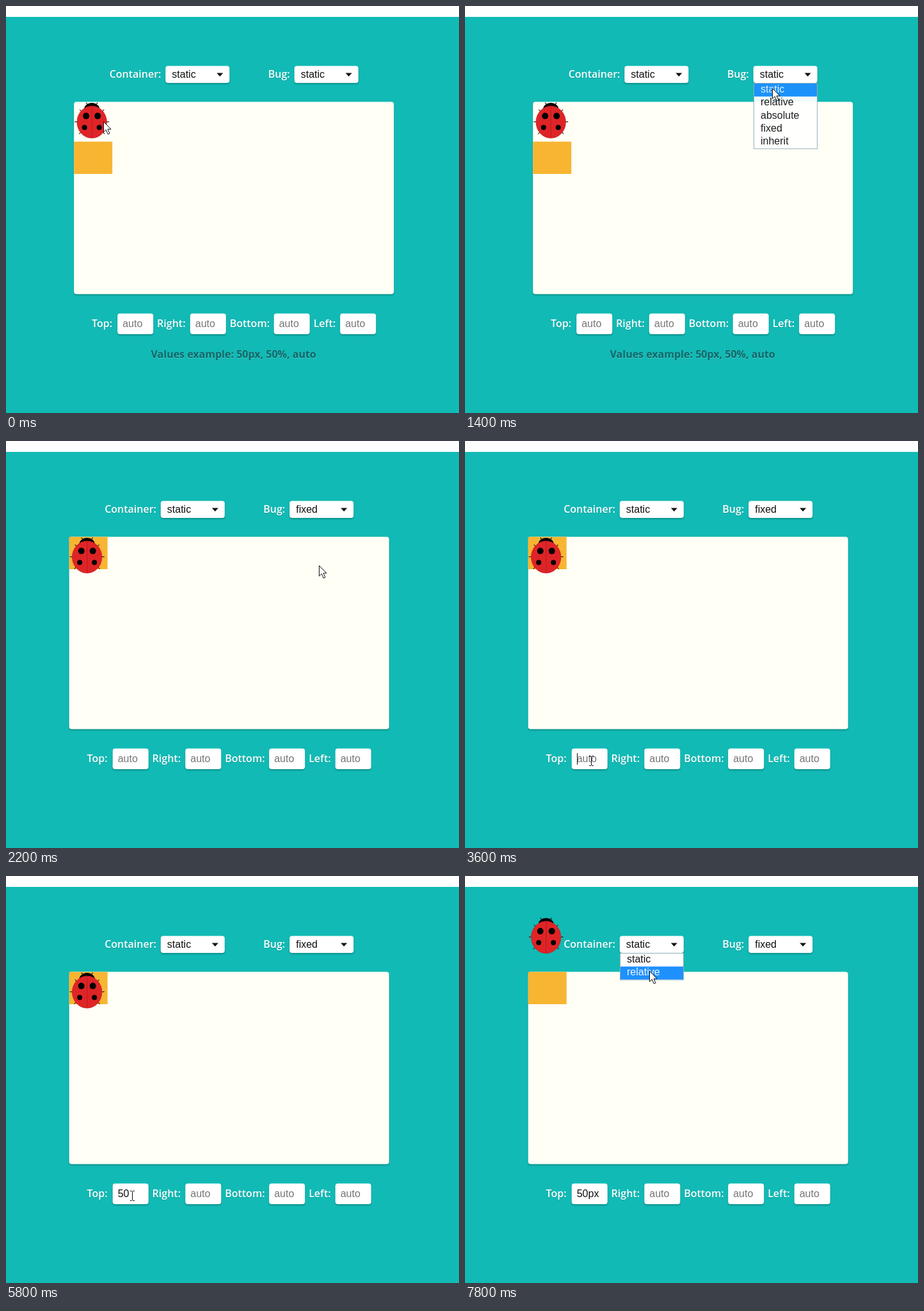
Write an HTML page that moves like this. It is 708 px wide and 635 px high and loops after 8000 ms.

```html
<!DOCTYPE html>
<html lang="en">
<head>
<meta charset="utf-8">
<title>CSS positioning demo</title>
<style>
  html, body { margin: 0; width: 100%; height: 100%; overflow: hidden; background: #fff; }
  svg { display: block; width: 708px; height: 635px; }
  .raised { filter: drop-shadow(0 2px 1px rgba(0, 0, 0, .22)); }
  .label { font: 600 16px "Open Sans", sans-serif; fill: #fff; }
  .label.shade { fill: rgba(0, 0, 0, .16); }
  .hint { font: 700 16px "Open Sans", sans-serif; fill: #126668; }
  .hint.glow { fill: rgba(255, 255, 255, .25); }
  .field { font: 16px "Liberation Sans", Arial, sans-serif; fill: #111; }
  .field.empty { fill: #757575; }
  .field.picked { fill: #f0f8ff; }
</style>
</head>
<body>
<svg id="stage" viewBox="0 0 708 635"></svg>
<script>
const stage = document.getElementById('stage');
const LOOP = 8000, STEP = 200;
const SCROLLBAR_SHIFT = 7.5;
const CONTAINER_OPTIONS = ['static', 'relative'];
const BUG_OPTIONS = ['static', 'relative', 'absolute', 'fixed', 'inherit'];
const ROW = 20.25, FADE = 160;
const SELECT_Y = 93.6, BOX_Y = 149.6, INPUT_Y = 479.7;

// Pointer waypoints: time, x, y
const POINTER = [
  [0, 152, 180], [200, 152, 180], [1000, 482, 106], [1200, 480, 108],
  [1400, 480, 128], [1800, 487, 187], [2000, 489, 194], [2200, 489, 194],
  [3200, 197, 499], [6400, 197, 499], [6800, 147, 453], [7000, 147, 453],
  [7400, 287, 108], [7600, 288, 128], [7800, 288, 148]
];

function pointerAt(t) {
  const next = POINTER.findIndex(p => p[0] > t);
  if (next < 0) return POINTER[POINTER.length - 1].slice(1);
  const [t0, x0, y0] = POINTER[next - 1], [t1, x1, y1] = POINTER[next];
  const u = (t - t0) / (t1 - t0), ease = u * u * (3 - 2 * u);
  return [Math.round(x0 + (x1 - x0) * ease), Math.round(y0 + (y1 - y0) * ease)];
}

function typedAt(t) {
  return t < 5000 ? '' : t < 5200 ? '5' : t < 6200 ? '50' : t < 6400 ? '50p' : '50px';
}

// The caret restarts its blink at focus and at every key press.
function caretOn(t) {
  if (t < 3400 || t >= 6600) return false;
  const since = [6400, 6200, 5200, 5000, 3400].find(start => t >= start);
  return (t - since) % 1000 < 500;
}

const rect = (x, y, w, h, fill, extra = '') =>
  `<rect x="${x}" y="${y}" width="${w}" height="${h}" fill="${fill}" ${extra}/>`;
const raised = (x, y, w, h, fill) => rect(x, y, w, h, fill, 'rx="4" class="raised"');
const text = (x, y, s, cls) => `<text x="${x}" y="${y}" class="${cls}">${s}</text>`;
const label = (x, y, s) => text(x, y + 1, s, 'label shade') + text(x, y, s, 'label');

function select(x, value) {
  return raised(x, SELECT_Y, 100, 26.4, '#fff') + text(x + 10, 112, value, 'field') +
    `<path d="M${x + 80} 104.5h10l-5 5.5z" fill="#111"/>`;
}

function dropdown(x, options, active, age) {
  const left = Math.round(x), height = options.length * ROW + 1;
  const rows = options.map((name, i) =>
    (i === active ? rect(left + 1, 121 + i * ROW, 98, ROW, '#1e90ff') : '') +
    text(left + 11, 135 + i * ROW, name, i === active ? 'field picked' : 'field'));
  return `<g opacity="${Math.min(1, age / FADE)}">` +
    rect(left + .5, 120.5, 99, height, '#fff', 'stroke="#8fadbb"') + rows.join('') + '</g>';
}

function input(x, value, caret) {
  const caretX = x + 8.5 + value.length * 8.9;
  return raised(x, INPUT_Y, 56, 32.3, '#fff') +
    text(x + 8, 501, value || 'auto', value ? 'field' : 'field empty') +
    (caret ? rect(Math.floor(caretX), 487, 1, 18, '#111') : '');
}

function ladybug(x, y) {
  const spots = [[19, 22, 5], [37, 22, 5], [16.5, 40, 4], [39.5, 40, 4]]
    .map(([cx, cy, r]) => `<circle cx="${cx}" cy="${cy}" r="${r}"/>`).join('');
  return `<g transform="translate(${x} ${y})">
    <path d="M19 1l3 4M37 1l-3 4M9 12l5 5M47 12l-5 5M1 31h5M55 31h-5M8 50l5-5M48 50l-5-5"
      stroke="#222" stroke-width="1.2" fill="none"/>
    <ellipse cx="28" cy="11" rx="12" ry="9.5"/>
    <ellipse cx="28" cy="31.5" rx="23.2" ry="25" fill="#df2427" stroke="#c81f23" stroke-width=".8"/>
    <path d="M28 7v49" stroke="#b71d20"/>${spots}</g>`;
}

function pointer(x, y, isText) {
  return `<g transform="translate(${x} ${y})">` + (isText
    ? '<path d="M-3 -7.5h2.5l1 1 1-1H4M.5-7V7M-3 7.5h2.5l1-1 1 1H4" fill="none" stroke="#111"/>'
    : '<path d="M.5 .5v16.3l3.8-3.6 3 6.8 2.7-1.2-3-6.6h5z" fill="#fff" stroke="#111"/>') + '</g>';
}

function scene(t) {
  const fixed = t >= 2000, moved = t >= 6800;
  const at = x => x - (fixed ? SCROLLBAR_SHIFT : 0);
  const box = at(106.2), containerX = at(249.3), bugX = at(450.7);
  const typed = typedAt(t), [px, py] = pointerAt(t);
  const inInput = px >= 167 && px < 223 && py >= 480 && py < 512;
  const fields = [['Top:', 134.1, 174.2], ['Right:', 236.1, 287.8],
    ['Bottom:', 349.7, 418.7], ['Left:', 480.7, 522.2]];

  let out = rect(0, 17, 708, 618, '#12bab5');
  out += label(at(161.7), 112, 'Container:') + select(containerX, 'static');
  out += label(at(409.7), 112, 'Bug:') + select(bugX, fixed ? 'fixed' : 'static');
  out += raised(box, BOX_Y, 500, 300, '#fffff6');
  out += rect(box, BOX_Y + (fixed ? 0 : 62), 60, 50.4, '#f7b532');
  out += ladybug(box, BOX_Y - (moved ? 85.5 : 0));
  fields.forEach(([name, labelX, inputX], i) => {
    out += label(at(labelX), 501, name) +
      input(at(inputX), i ? '' : typed, i === 0 && caretOn(t));
  });
  if (!fixed) {
    const hint = 'Values example: 50px, 50%, auto';
    out += text(226.5, 550, hint, 'hint glow') + text(226.5, 549, hint, 'hint');
  }
  const hovered = Math.max(0, Math.floor((py - 121) / ROW));
  if (t > 1250 && t < 2000) out += dropdown(bugX, BUG_OPTIONS, hovered, t - 1250);
  if (t > 7450) out += dropdown(containerX, CONTAINER_OPTIONS, hovered, t - 7450);
  return out + pointer(px, py, inInput);
}

let shown = -1;
function tick(now) {
  const t = Math.floor((now % LOOP) / STEP) * STEP;
  if (t !== shown) stage.innerHTML = scene(shown = t);
  requestAnimationFrame(tick);
}
tick(performance.now());
</script>
</body>
</html>
```
